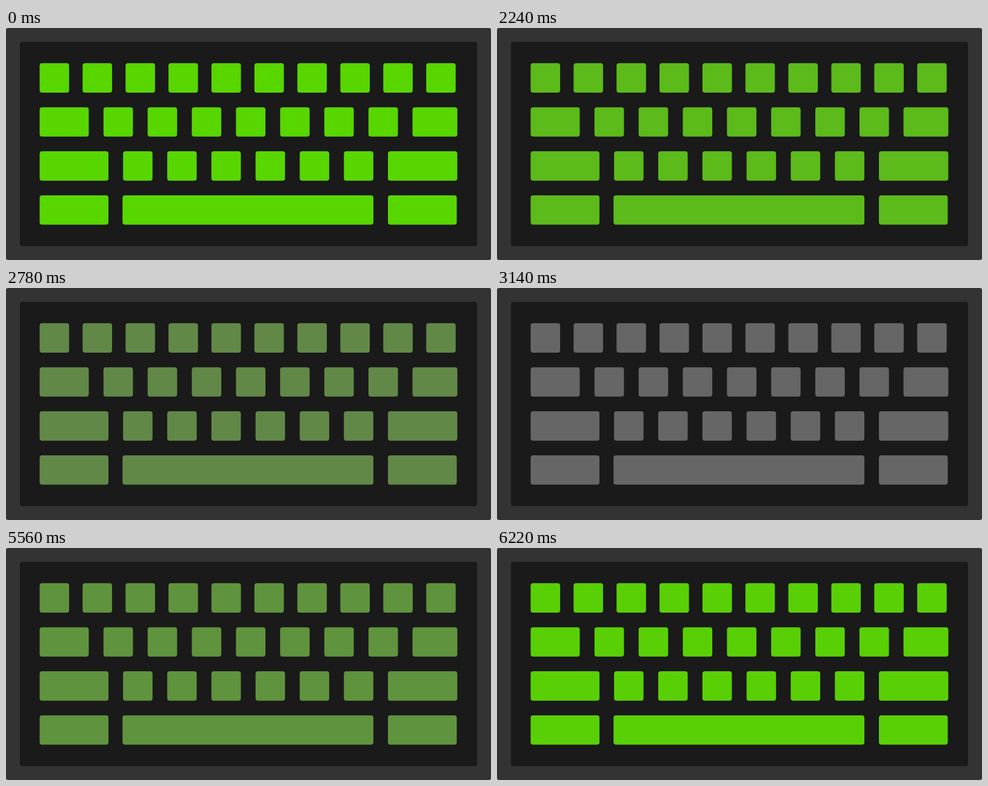
Recreate the animation shown at these times as an HTML page. Size 800x384 px, loop 6.28 s.

```html
<!DOCTYPE html>
<html lang="en">
<head>
<meta charset="utf-8">
<title>Keyboard backlight</title>
<style>
  html, body { margin: 0; width: 100%; height: 100%; overflow: hidden; background: #fff; }
  svg { display: block; width: 100%; height: 100%; }
  #keys { fill: #58d600; animation: glow 6280ms infinite; }

  /* 19 in-between shades, 60 ms each, on the way out and back */
  @keyframes glow {
    0% { fill: #58d600; animation-timing-function: step-end; }
    31.8471% { fill: #58d600; animation-timing-function: steps(19, jump-both); }
    50% { fill: #666; animation-timing-function: step-end; }
    81.8471% { fill: #666; animation-timing-function: steps(19, jump-both); }
    100% { fill: #58d600; }
  }
</style>
</head>
<body>
<svg viewBox="0 0 800 384">
  <rect width="800" height="384" rx="3" fill="#333"/>
  <rect x="23" y="23" width="754" height="338" rx="4" fill="#1a1a1a"/>
  <g id="keys"></g>
</svg>
<script>
  const keys = document.getElementById('keys');
  const KEY = 48.6;
  const rowY = row => 58.3 + row * 72.9;

  function addKey(row, x, width = KEY) {
    const rect = document.createElementNS('http://www.w3.org/2000/svg', 'rect');
    const attrs = { x, y: rowY(row), width, height: KEY, rx: 4 };
    for (const name in attrs) rect.setAttribute(name, attrs[name]);
    keys.append(rect);
  }

  function addRun(row, x, pitch, count) {
    for (let i = 0; i < count; i++) addKey(row, x + i * pitch);
  }

  addRun(0, 55.5, 70.85, 10);

  addKey(1, 55.5, 81);
  addRun(1, 160.8, 72.85, 7);
  addKey(1, 670.5, 74);

  addKey(2, 55.5, 113.5);
  addRun(2, 193.1, 72.85, 6);
  addKey(2, 630, 114.4);

  addKey(3, 55.5, 113.5);
  addKey(3, 192.2, 413.8);
  addKey(3, 630, 113.5);
</script>
</body>
</html>
```
